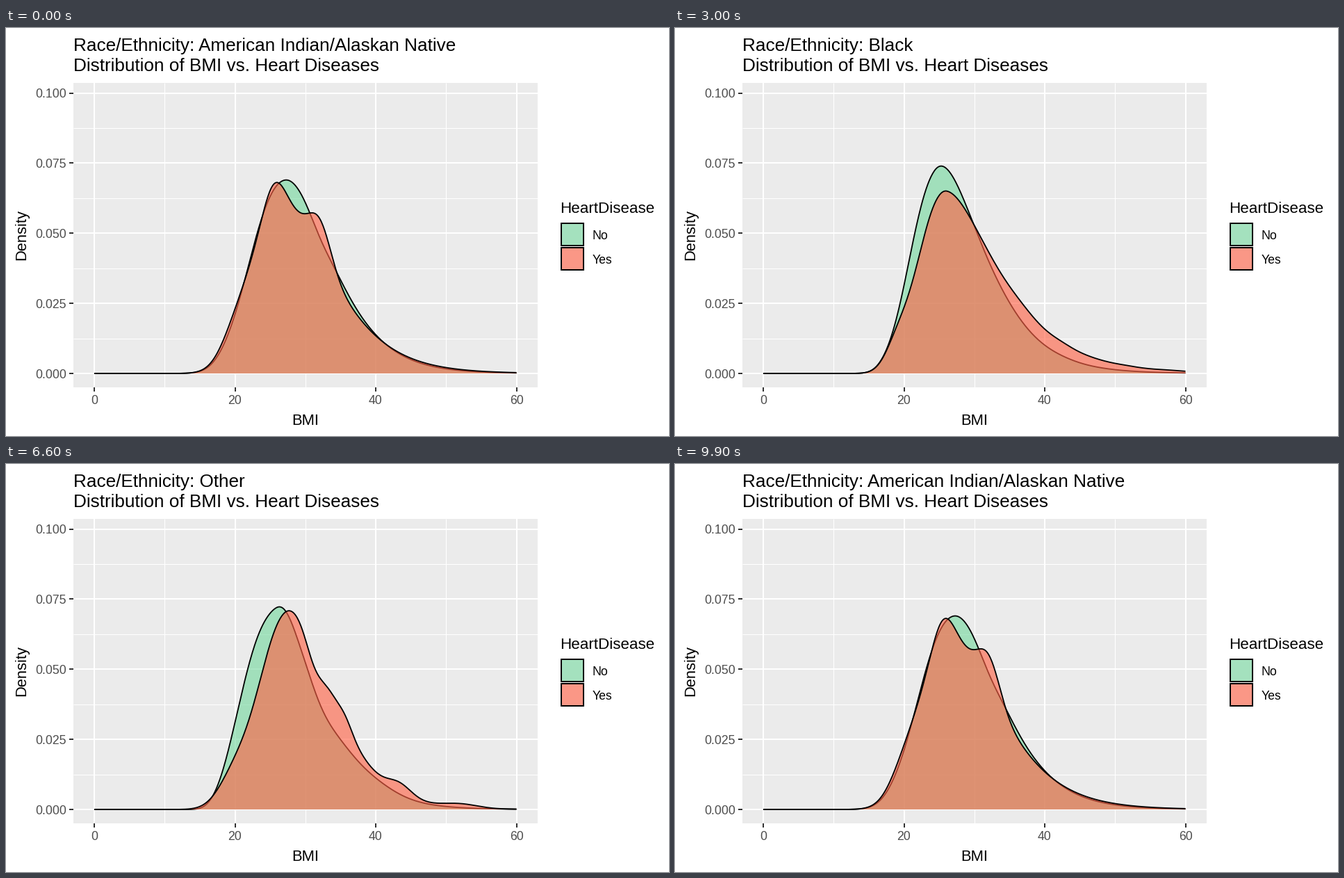
These frames come from a looping animation (954x587 px, 10000 ms). A matplotlib script:

```python
import numpy as np
import matplotlib.pyplot as plt
from matplotlib.animation import FuncAnimation
from matplotlib.patches import Polygon, Rectangle

W, H, DPI = 954, 587, 64
PT = 72 / DPI  # points per pixel
LEFT, TOP, RIGHT, BOTTOM = 96.6, 79, 765, 517
GREEN, RED, ALPHA = "#77d8a0", "#ff6347", 0.63
STARTS = np.array([7, 24, 41, 57, 74, 91])  # first frame of each transition
STEPS = 10

plt.rcParams["font.family"] = "Liberation Sans"

BMI = np.linspace(0, 60, 512)
ORIGIN = 10  # lowest BMI of the skewed bell


def px(bmi):
    return 127 + 10.125 * np.asarray(bmi)


def py(density):
    return 497 - 4035 * np.asarray(density)


def bell(peak, height, left, right, *bumps):
    """Log-normal shape with a spread per side, plus (centre, height, width) bumps.

    Heights are in thousandths of density.
    """
    u = np.log(np.maximum(BMI - ORIGIN, 1e-6) / (peak - ORIGIN))
    y = height * np.exp(-0.5 * (u / np.where(u < 0, left, right)) ** 2)
    for centre, size, width in bumps:
        y += size * np.exp(-0.5 * ((BMI - centre) / width) ** 2)
    return np.maximum(y, 0) / 1000


# Each group: density without ("No") and with ("Yes") heart disease
GROUPS = [
    ("American Indian/Alaskan Native",
     bell(27.3, 69, .339, .307, (18.5, 3.2, 2), (32, -2, 1.5)),
     bell(27, 58, .332, .332, (19.5, 7, 2.2), (25.5, 11.5, 1.6), (32.1, 12.5, 1.6))),
    ("Asian",
     bell(24.4, 98.8, .343, .222, (34.2, 5, 2.7), (42.5, 1.5, 2)),
     bell(25.2, 84.8, .288, .243, (19.3, 17.5, 1.6), (36.6, 7.5, 1.9),
          (42.5, 3.5, 1.4), (51.5, 1.1, 1.3), (57.5, 1.1, 1.3))),
    ("Black",
     bell(25.6, 71.5, .324, .339, (17.5, 2, 1.5)),
     bell(26.1, 62.9, .279, .387, (18.8, 8, 1.7))),
    ("Hispanic",
     bell(26.3, 76.5, .308, .298, (18.5, 3, 1.8)),
     bell(27.3, 70.5, .245, .310, (19.8, 11, 2.2), (37.5, 2.3, 1.6), (44.5, -1.8, 1.5))),
    ("Other",
     bell(26, 70.5, .367, .316, (27, 2.3, 1.2), (32, -4.5, 2), (40, 1.5, 3)),
     bell(27.8, 71, .274, .283, (19.8, 11.5, 2.2), (31.3, -7.5, 1.3),
          (35.7, 2.8, 1), (43.4, 3.7, 1.7), (52, 1.4, 2.5))),
    ("White",
     bell(25.8, 78, .335, .279, (40.5, 3.3, 4)),
     bell(26.8, 76, .257, .290, (19.2, 9.3, 2), (42.5, 2.2, 3))),
]

fig = plt.figure(figsize=(W / DPI, H / DPI), dpi=DPI, facecolor="white")
ax = fig.add_axes([0, 0, 1, 1])
ax.set_xlim(0, W)
ax.set_ylim(H, 0)
ax.axis("off")


def text(x, y, s, size, color="black", va="baseline", **kw):
    return ax.text(x, y, s, size=size * PT, color=color, va=va, **kw)


def line(x, y, color, width, z):
    return ax.plot(x, y, color=color, lw=width * PT, zorder=z,
                   solid_capstyle="butt")[0]


def rect(x, y, w, h, z, **kw):
    ax.add_patch(Rectangle((x, y), w, h, zorder=z, **kw))


# Panel, grid and axes
rect(LEFT, TOP, RIGHT - LEFT, BOTTOM - TOP, 0, fc="#ebebeb", lw=0)
for bmi in range(0, 61, 10):
    x, major = px(bmi), bmi % 20 == 0
    line([x, x], [TOP, BOTTOM], "white", 2 if major else 1, 1 + major)
    if major:
        line([x, x], [BOTTOM, BOTTOM + 5.5], "#333333", 2, 1)
        text(x, 541, str(bmi), 17.6, "#4d4d4d", ha="center")
for i in range(9):
    d, major = i / 80, i % 2 == 0
    y = py(d)
    line([LEFT, RIGHT], [y, y], "white", 2 if major else 1, 1 + major)
    if major:
        line([LEFT - 5.5, LEFT], [y, y], "#333333", 2, 1)
        text(87, y + 6.5, f"{d:.3f}", 17.6, "#4d4d4d", ha="right")

text(431, 571, "BMI", 22, ha="center")
text(22.5, 298, "Density", 22, va="center", ha="center", rotation=90)

# Legend
text(797.5, 266, "HeartDisease", 22.4)
for y, color, label in ((280.6, GREEN, "No"), (315.6, RED, "Yes")):
    rect(798.8, y, 32.2, 32, 1, fc="#f2f2f2", lw=0)
    rect(798.8, y, 32.2, 32, 2, fc=color, alpha=ALPHA, lw=0)
    rect(798.8, y, 32.2, 32, 3, fill=False, ec="black", lw=2 * PT)
    text(843.5, y + 23.7, label, 17.6)

heading = text(LEFT, 33.5, "", 26.1)
text(LEFT, 62.2, "Distribution of BMI vs. Heart Diseases", 26.1)

# Density areas: "No" below, "Yes" on top
XS = px(BMI)
BASE = [(XS[-1], py(0)), (XS[0], py(0))]
areas, outlines = [], []
for k, color in enumerate((GREEN, RED)):
    area = Polygon(BASE, fc=color, alpha=ALPHA, lw=0, zorder=4 + 2 * k)
    areas.append(ax.add_patch(area))
    outlines.append(line(XS, py(0 * BMI), "black", 1.8, 5 + 2 * k))


def ease(t):
    return 4 * t**3 if t < 0.5 else 1 - 4 * (1 - t) ** 3


def update(frame):
    k = int(np.sum(frame >= STARTS)) - 1
    t = min((frame - STARTS[k] + 1) / STEPS, 1) if k >= 0 else 1
    old, *before = GROUPS[k]
    new, *after = GROUPS[(k + 1) % len(GROUPS)]
    heading.set_text("Race/Ethnicity: " + (new if t >= 0.5 else old))
    for area, outline, a, b in zip(areas, outlines, before, after):
        ys = py(a + (b - a) * ease(t))
        area.set_xy(np.vstack([np.column_stack([XS, ys]), BASE]))
        outline.set_ydata(ys)
    return [heading, *areas, *outlines]


anim = FuncAnimation(fig, update, frames=100, interval=100, repeat=True,
                     repeat_delay=0, blit=False)
plt.show()
```
